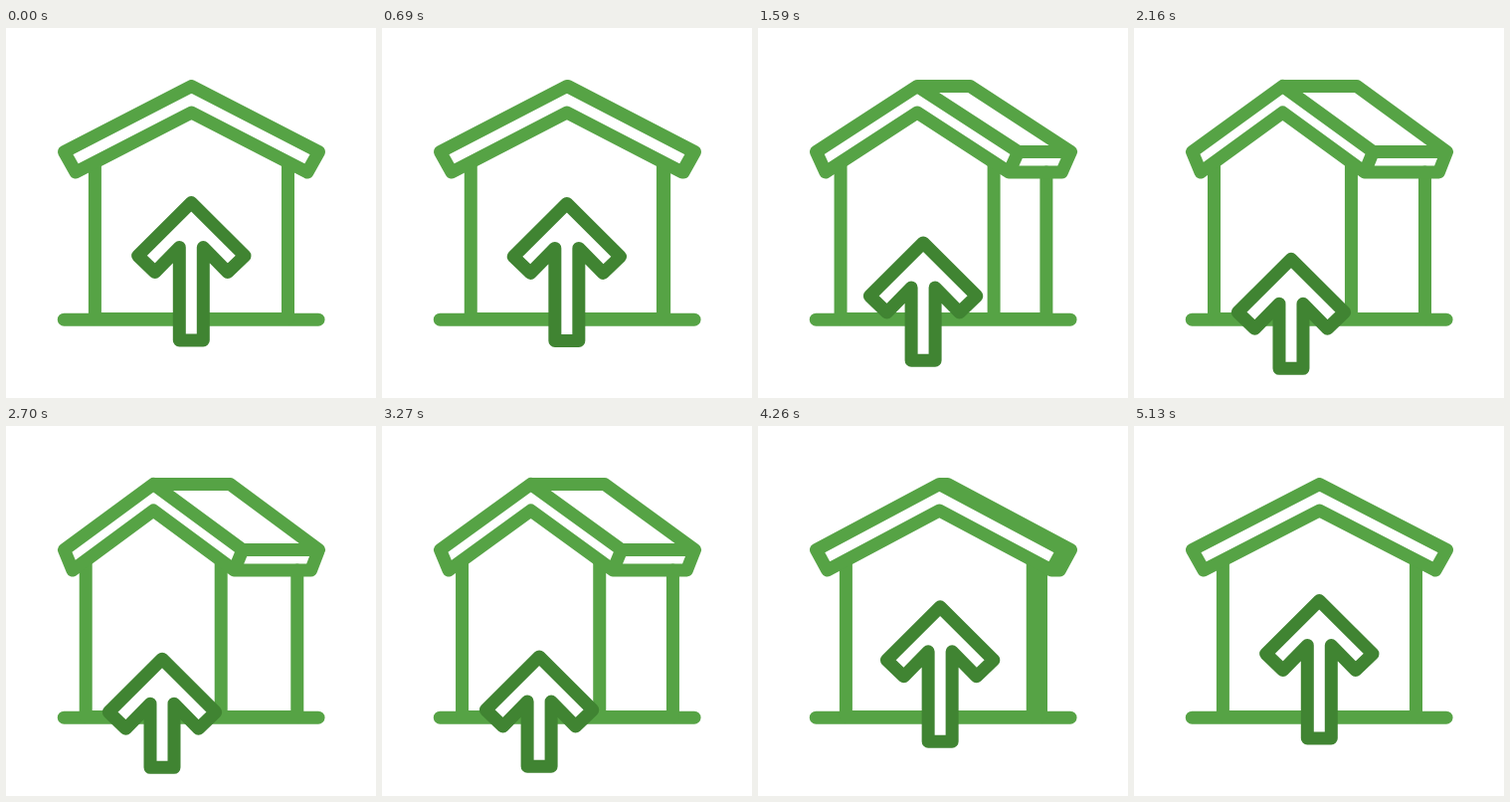
An HTML page for the animation above (5400 ms loop, 372 by 372 pixels).

```html
<!DOCTYPE html>
<html lang="en">
<head>
<meta charset="utf-8">
<title>House and arrow</title>
<style>
  html, body { margin: 0; width: 100%; height: 100%; overflow: hidden; background: #fff; }
  svg { display: block; width: 100vw; height: 100vh; }
  path { fill: none; stroke-width: 13; stroke-linecap: round; stroke-linejoin: round; }
  .house { stroke: #56a345; }
  .arrow { stroke: #408432; fill: #fff; }
</style>
</head>
<body>
<svg viewBox="0 0 372 372">
  <path class="house" d="M58.3 293.2H314" stroke-width="12.5"/>
  <path class="house" id="walls"/>
  <path class="house" id="roof"/>
  <path class="arrow" id="arrow"/>
</svg>
<script>
const LOOP = 5400, STEP = 30, HOLD = 300;
const walls = document.getElementById('walls');
const roof = document.getElementById('roof');
const arrow = document.getElementById('arrow');

// Symmetric cubic-bezier(a, 0, 1 - a, 1)
function ease(x, a = 0.84) {
  let lo = 0, hi = 1;
  for (let i = 0; i < 24; i++) {
    const s = (lo + hi) / 2, r = 1 - s;
    if (3 * a * s * r * r + 3 * (1 - a) * s * s * r + s ** 3 < x) lo = s;
    else hi = s;
  }
  return lo * lo * (3 - 2 * lo);
}

// 0 = seen from the front, 1 = turned to the side
function turnAt(time) {
  const half = LOOP / 2;
  const t = half - Math.abs(time - half);
  return t <= HOLD ? 0 : ease((t - HOLD) / (half - HOLD));
}

function draw(p) {
  const mix = (from, to) => from + (to - from) * p;

  const left = mix(89.4, 80.2), front = mix(283.5, 216.2), back = mix(283.5, 292.8);
  walls.setAttribute('d',
    `M${left} 136V292.5H${back}V145M${front} 136V292.5`);

  const ridge = mix(186.5, 148.2), backRidge = mix(186.5, 225.3);
  const eave = mix(314.5, 237.9), lip = mix(303, 229.5);
  const leftLip = mix(70, 66.9), backLip = mix(303, 306.6);
  roof.setAttribute('d',
    `M${ridge} 58.5L58.5 124.5L${leftLip} 145L${ridge} 85L${lip} 145L${eave} 124.5Z` +
    `H${backRidge}L314.5 124.5L${backLip} 145H${lip}M${eave} 124.5H314.5`);

  const x = mix(186.3, 157), y = mix(175.5, 234.2), foot = mix(314, 343.3);
  arrow.setAttribute('d',
    `M${x} ${y}l-53.7 53.5l17.2 16.5l24.5 -25V${foot}h24V${y + 45}l24.5 25l17.2 -16.5Z`);
}

function frame() {
  const time = performance.now() % LOOP;
  draw(turnAt(Math.floor(time / STEP) * STEP));
  requestAnimationFrame(frame);
}
frame();
</script>
</body>
</html>
```
